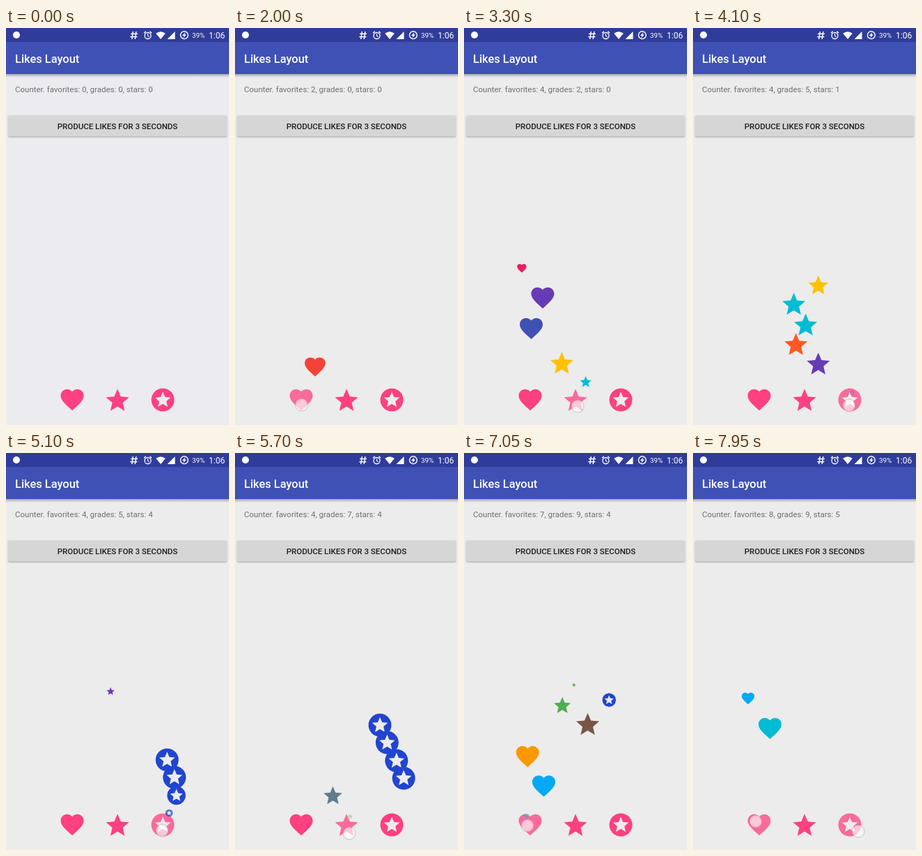
Recreate the animation shown at these times as an HTML page with a canvas. Size 320 px wide and 569 px high, loop 8000 ms.

```html
<!DOCTYPE html>
<html lang="en">
<head>
<meta charset="utf-8">
<title>Likes Layout</title>
<style>
  html, body { margin: 0; width: 100%; height: 100%; overflow: hidden; background: #ececec; }
  canvas, svg { position: absolute; left: 0; top: 0; width: 320px; height: 569px; }
  text { font-family: Roboto, sans-serif; fill: #fff; }
  .medium { font-weight: 500; }
</style>
</head>
<body>
<canvas id="stage"></canvas>
<svg viewBox="0 0 320 569">
  <text x="267" y="14" font-size="9.8">39%</text>
  <text x="291" y="15" font-size="12">1:06</text>
  <text class="medium" x="13" y="50" font-size="16.4">Likes Layout</text>
  <text id="counter" x="13" y="91.5" font-size="11.5" style="fill:#6f6f6f"></text>
  <text class="medium" x="160" y="145" font-size="11.5" text-anchor="middle" style="fill:#1c1c1c">PRODUCE LIKES FOR 3 SECONDS</text>
</svg>
<script>
const LOOP = 8000;
const W = 320, H = 569;
const PINK = '#ff4081';
const UNIT = 1.65;               // pixels per icon grid unit
const START_Y = 526, RISE = 196; // vertical run of a like
const SWAY = 207;

const kinds = {
  heart: {
    x: 95, cy: 12.18, life: 1405,
    path: new Path2D('M12 21.35l-1.45-1.32C5.4 15.36 2 12.28 2 8.5 2 5.42 4.42 3 7.5 3c1.74 0 3.41.81 4.5 2.09C13.09 3.81 14.76 3 16.5 3 19.58 3 22 5.42 22 8.5c0 3.78-3.4 6.86-8.55 11.54z')
  },
  grade: {
    x: 160, cy: 11.5, life: 1405,
    path: new Path2D('M12 17.27L18.18 21l-1.64-7.03L22 9.24l-7.19-.61L12 2 9.19 8.63 2 9.24l5.46 4.73L5.82 21z')
  },
  badge: {
    x: 225, cy: 12, life: 2360,
    path: new Path2D('M2 12a10 10 0 1 0 20 0a10 10 0 1 0-20 0zM16.23 18L12 15.45 7.77 18l1.12-4.81-3.73-3.23 4.92-.42L12 5l1.92 4.53 4.92.42-3.73 3.23z')
  }
};

// kind, birth time, colour, first side of the sway
const likes = [
  ['heart', 1713, '#f44336', 1],
  ['heart', 2000, '#e91e63', 1],
  ['heart', 2304, '#673ab7', -1],
  ['heart', 2619, '#3f51b5', 1],
  ['grade', 2970, '#ffc107', -1],
  ['grade', 3164, '#00bcd4', 1],
  ['grade', 3376, '#00bcd4', -1],
  ['grade', 3577, '#ff5722', -1],
  ['grade', 3777, '#673ab7', 1],
  ['badge', 4064, '#2145cf', 1],
  ['badge', 4365, '#2145cf', 1],
  ['badge', 4678, '#2145cf', 1],
  ['badge', 4980, '#2145cf', 1],
  ['grade', 5447, '#607d8b', -1],
  ['grade', 5662, '#4caf50', 1],
  ['grade', 5870, '#4caf50', 1],
  ['grade', 6064, '#795548', -1],
  ['heart', 6400, '#ff9800', -1],
  ['heart', 6703, '#03a9f4', 1],
  ['heart', 7011, '#00bcd4', -1],
  ['badge', 7930, '#2145cf', 1],
  ['heart', 7940, '#e91e63', 1]
];

// kind, press, release, finger x and y
const touches = [
  ['heart', 1690, 2720, 95.5, 540],
  ['grade', 2950, 3880, 163, 542],
  ['badge', 4045, 5160, 224, 541],
  ['grade', 5430, 6190, 164, 545],
  ['heart', 6385, 7180, 91, 534],
  ['badge', 7905, LOOP, 237, 542],
  ['heart', 7915, LOOP, 90, 528]
];

const canvas = document.getElementById('stage');
const counter = document.getElementById('counter');
const ctx = canvas.getContext('2d');
const dpr = window.devicePixelRatio || 1;
canvas.width = W * dpr;
canvas.height = H * dpr;

const clamp = v => Math.max(0, Math.min(1, v));

function rect(x, y, w, h, fill) {
  ctx.fillStyle = fill;
  ctx.fillRect(x, y, w, h);
}

function disc(x, y, r, fill) {
  ctx.fillStyle = fill;
  ctx.beginPath();
  ctx.arc(x, y, r, 0, 7);
  ctx.fill();
}

function ring(x, y, r, width, color) {
  ctx.strokeStyle = color;
  ctx.lineWidth = width;
  ctx.beginPath();
  ctx.arc(x, y, r, 0, 7);
  ctx.stroke();
}

function line(width, ...pts) {
  ctx.strokeStyle = '#fff';
  ctx.lineWidth = width;
  ctx.beginPath();
  for (let i = 0; i < pts.length; i += 2) ctx.lineTo(pts[i], pts[i + 1]);
  ctx.stroke();
}

function poly(...pts) {
  ctx.fillStyle = '#fff';
  ctx.beginPath();
  for (let i = 0; i < pts.length; i += 2) ctx.lineTo(pts[i], pts[i + 1]);
  ctx.fill();
}

function icon(kind, x, y, scale, color, alpha) {
  ctx.save();
  ctx.translate(x, y);
  ctx.scale(UNIT * scale, UNIT * scale);
  ctx.translate(-12, -kind.cy);
  ctx.globalAlpha = alpha;
  ctx.fillStyle = color;
  ctx.fill(kind.path, 'evenodd');
  ctx.restore();
}

function shade(y, h, strength) {
  const g = ctx.createLinearGradient(0, y, 0, y + h);
  g.addColorStop(0, `rgba(0,0,0,${strength})`);
  g.addColorStop(1, 'rgba(0,0,0,0)');
  rect(0, y, W, h, g);
}

function statusBar() {
  rect(0, 0, W, 20, '#303c9a');
  disc(15, 10, 5, '#fff');
  // hash
  line(1.5, 182.3, 5, 180.7, 16);
  line(1.5, 186.8, 5, 185.2, 16);
  line(1.5, 179, 8.4, 189, 8.4);
  line(1.5, 178.3, 12.6, 188.3, 12.6);
  // alarm
  ring(203.5, 11, 4.5, 1.3, '#fff');
  line(1.1, 203.5, 8.2, 203.5, 11.3, 205.7, 12.6);
  line(1.4, 198, 7.2, 200.7, 4.9);
  line(1.4, 209, 7.2, 206.3, 4.9);
  // wifi
  ctx.fillStyle = '#fff';
  ctx.beginPath();
  ctx.moveTo(222, 16);
  ctx.lineTo(215.2, 7.8);
  ctx.quadraticCurveTo(222, 2.8, 228.8, 7.8);
  ctx.fill();
  // signal
  poly(231.5, 16, 242.5, 16, 242.5, 5);
  // charging
  ring(255.8, 10.2, 5.4, 1.4, '#fff');
  poly(257.5, 6, 252.8, 11, 255.4, 11, 254.2, 14.4, 258.9, 9.4, 256.3, 9.4);
}

function scenery(t) {
  const k = clamp((t - 50) / 750);
  rect(0, 0, W, H, `rgb(236,${235 + k},${240 - 4 * k})`);
  shade(66, 5, 0.28);
  rect(0, 20, W, 46, '#3f51b5');
  statusBar();

  ctx.save();
  ctx.shadowColor = 'rgba(0,0,0,0.3)';
  ctx.shadowBlur = 2 * dpr;
  ctx.shadowOffsetY = dpr;
  ctx.fillStyle = '#d6d6d7';
  ctx.beginPath();
  ctx.roundRect(3, 125.5, 314, 30, 2);
  ctx.fill();
  ctx.restore();
}

function drawLike([name, birth, color, side], t) {
  const kind = kinds[name];
  const u = (t - birth) / kind.life;
  if (u <= 0 || u >= 1) return;
  const x = kind.x + side * SWAY * u * (1 - u) * (1 - 2 * u);
  const scale = Math.min(1, 0.13 + 3.76 * Math.min(u, 1 - u));
  icon(kind, x, START_Y - RISE * u, scale, color, clamp(u / 0.07));
}

function pressure([, down, up], t) {
  return Math.min(clamp((t - down) / 35), clamp((up + 80 - t) / 80));
}

function drawTouch(touch, t) {
  const p = pressure(touch, t);
  if (!p) return;
  const [, , , x, y] = touch;
  ctx.globalAlpha = p;
  disc(x, y, 9, 'rgba(255,255,255,0.55)');
  ring(x, y, 9, 1, 'rgba(130,120,145,0.4)');
  disc(x, y, 6.5, 'rgba(255,255,255,0.2)');
  ctx.globalAlpha = 1;
}

function draw(t) {
  ctx.setTransform(dpr, 0, 0, dpr, 0, 0);
  scenery(t);

  for (const name in kinds) {
    const held = touches.filter(d => d[0] === name).map(d => pressure(d, t));
    icon(kinds[name], kinds[name].x, 533, 1, PINK, 1 - 0.25 * Math.max(...held));
  }
  likes.forEach(like => drawLike(like, t));
  touches.forEach(touch => drawTouch(touch, t));

  const count = name => likes.filter(l => l[0] === name && l[1] <= t).length;
  const label = `Counter. favorites: ${count('heart')}, grades: ${count('grade')}, stars: ${count('badge')}`;
  if (counter.textContent !== label) counter.textContent = label;
}

const began = performance.now();
function tick() {
  draw((performance.now() - began) % LOOP);
  requestAnimationFrame(tick);
}
tick();
</script>
</body>
</html>
```
